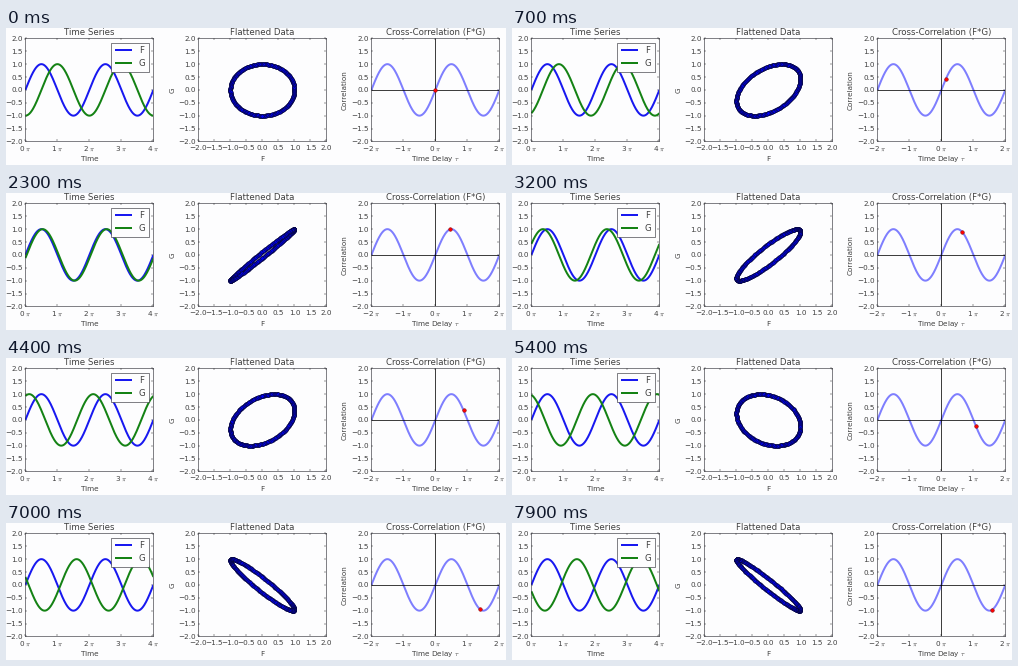
Animation, 500 px wide and 137 px high, one loop 8 s. Source, as a matplotlib script:

```python
import numpy as np
import matplotlib.pyplot as plt
from matplotlib.animation import FuncAnimation

W, H, DPI = 500, 137, 64
PX = 72 / DPI            # points per pixel
FRAMES, INTERVAL = 80, 100
SMALL, LARGE = 7.2 * PX, 8.6 * PX
THIN, THICK = 0.6 * PX, 2 * PX
TOP, BOTTOM, WIDTH = 10.4, 113.4, 128
MIDDLE = (TOP + BOTTOM) / 2
INK, BLUE, GREEN = "#404040", "#1818f0", "#148214"

plt.rcParams.update({
    "font.family": "DejaVu Sans",
    "font.size": SMALL,
    "mathtext.fontset": "cm",
    "text.color": INK,
    "xtick.labelcolor": INK,
    "ytick.labelcolor": INK,
    "axes.edgecolor": "#303038",
    "axes.linewidth": THIN,
    "axes.titlesize": LARGE,
    "axes.titlepad": 3.4 * PX,
    "lines.solid_capstyle": "butt",
    "legend.fontsize": LARGE,
    "patch.linewidth": THIN,
})

fig = plt.figure(figsize=(W / DPI, H / DPI), dpi=DPI, facecolor="#fdfdfe")


def label(x, y, text, **kw):
    fig.text(x / W, 1 - y / H, text, ha="center", fontsize=SMALL, **kw)


def panel(left, title, xlabel, xlim):
    ax = fig.add_axes([left / W, 1 - BOTTOM / H, WIDTH / W, (BOTTOM - TOP) / H],
                      facecolor="none")
    ax.set_title(title)
    ax.set_xlim(*xlim)
    ax.set_ylim(-2, 2)
    ax.set_yticks(np.arange(-2, 2.1, 0.5))
    ax.tick_params(direction="in", top=True, right=True, length=2.4 * PX,
                   width=0.4 * PX, pad=2.4 * PX, labelsize=SMALL)
    ax.tick_params(axis="x", pad=3.2 * PX)
    label(left + WIDTH / 2, 133, xlabel, va="baseline")
    return ax


def pi_ticks(ax, lo, hi):
    steps = range(lo, hi + 1)
    names = [f"{k} $\\pi$".replace("-", "\u2212") for k in steps]
    ax.set_xticks([k * np.pi for k in steps], names)


def lead(t, tau):
    return -np.cos(t + tau)


t = np.linspace(0, 4 * np.pi, 300)
f = np.sin(t)

series = panel(19.4, "Time Series", "Time", (0, 4 * np.pi))
pi_ticks(series, 0, 4)
series.plot(t, f, color=BLUE, lw=THICK, label="F")
g_line, = series.plot(t, lead(t, 0), color=GREEN, lw=THICK, label="G")
series.legend(loc="upper right", fancybox=False, framealpha=1,
              facecolor="#fdfdfe", edgecolor="#303038")

flat = panel(192.4, "Flattened Data", "F", (-2, 2))
flat.set_xticks(np.arange(-2, 2.1, 0.5))
label(167, MIDDLE, "G", va="center", rotation=90)
ring, = flat.plot(f, lead(t, 0), "o", ms=3.5 * PX, mfc="blue", mec="#080830",
                  mew=THIN)

cross = panel(365.4, "Cross-Correlation (F*G)", "Time Delay $\\tau$",
              (-2 * np.pi, 2 * np.pi))
pi_ticks(cross, -2, 2)
label(339, MIDDLE, "Correlation", va="center", rotation=90)
delay = t - 2 * np.pi
cross.plot(delay, np.sin(delay), color="blue", alpha=0.5, lw=THICK)
cross.axhline(0, color="black", lw=0.75 * PX)
cross.axvline(0, color="black", lw=0.75 * PX)
dot, = cross.plot([0], [0], "o", ms=3.6 * PX, mfc="red", mec="#801010",
                  mew=0.5 * PX, zorder=5)


def update(i):
    tau = 0.02 * np.pi * i
    g = lead(t, tau)
    g_line.set_ydata(g)
    ring.set_ydata(g)
    dot.set_data([tau], [np.sin(tau)])
    return g_line, ring, dot


anim = FuncAnimation(fig, update, frames=FRAMES, interval=INTERVAL,
                     repeat=True, repeat_delay=0, blit=False)
plt.show()
```
